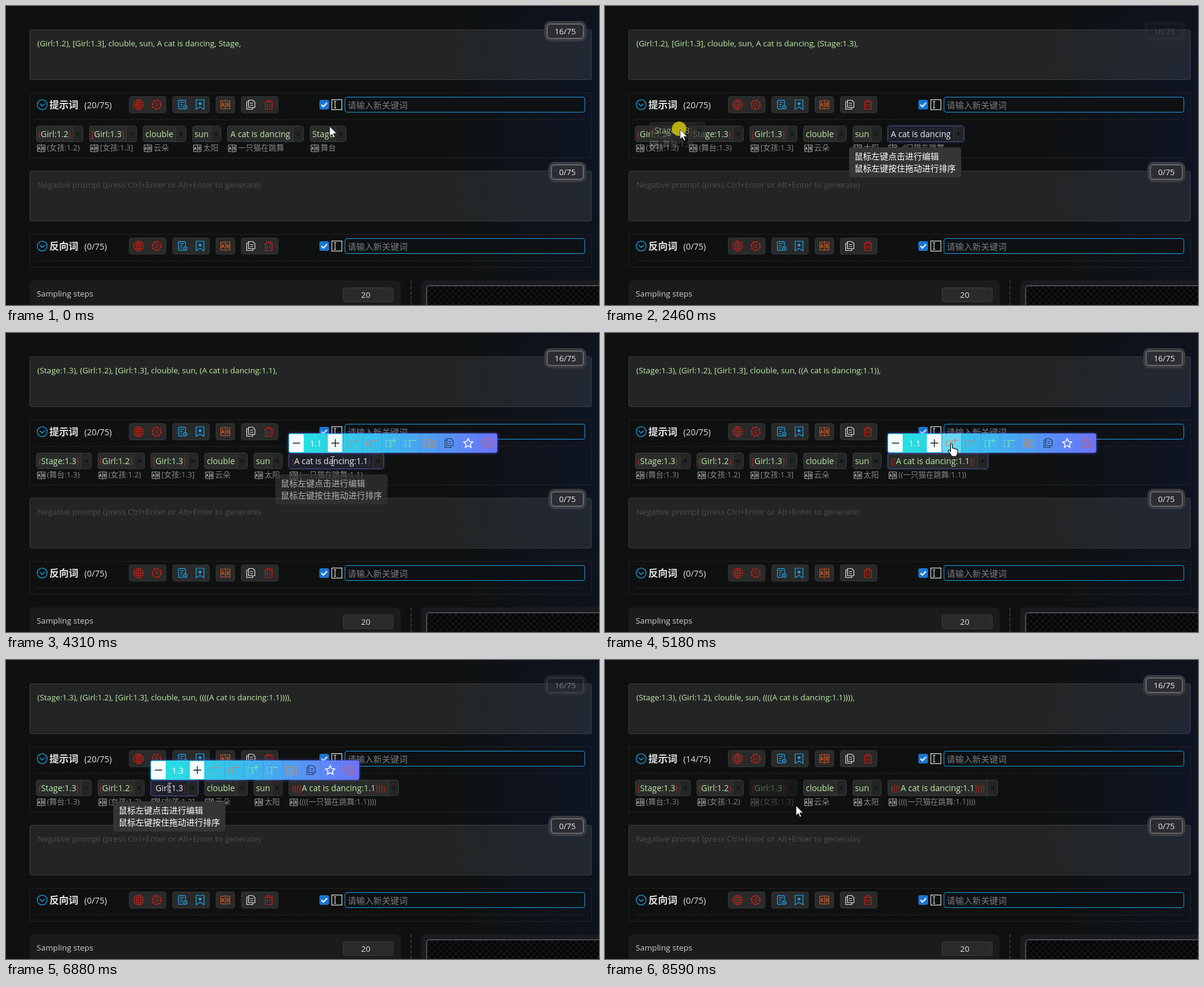
Animation, 984 px wide and 497 px high, one loop 8.89 s. Source, as an HTML page:

```html
<!DOCTYPE html>
<html lang="zh-CN">
<head>
<meta charset="utf-8">
<title>Prompt editor</title>
<style>
html, body { margin: 0; width: 100%; height: 100%; overflow: hidden; background: #0f1110; }
#stage { position: relative; width: 984px; height: 497px; overflow: hidden; cursor: default;
  background: radial-gradient(ellipse 300px 520px at 1020px 190px, #0e1524 0, #0e131e 40%, #0f1110 100%);
  font: 14px/20px "Open Sans", "Noto Sans CJK SC", "Noto Sans CJK", sans-serif; color: #e2e2e2; }
#stage * { box-sizing: border-box; }
#stage div, #stage svg.ico, #stage .abs { position: absolute; white-space: nowrap; }
svg { overflow: visible; fill: none; stroke: currentColor; stroke-width: 1.2; }
.area { left: 39px; width: 933px; height: 84px; border: 1px solid rgba(255,255,255,.1); border-radius: 4px;
  background: rgba(255,255,255,.085); }
.text { left: 52px; font-size: 13.25px; }
.counter { height: 26px; border: 2px solid #65676a; border-radius: 6px; background: #2b2d33;
  box-shadow: 0 0 0 4px #393b3e; font-size: 13.25px; line-height: 22px; text-align: center; color: #eee; }
.section { left: 39px; width: 933px; border: 1px solid #212323; }
.section .rule { left: 10px; top: 43px; width: 911px; border-top: 1px dashed #2c2e2e; }
.title { left: 32px; top: 9px; font-size: 16px; font-weight: 700; color: #e6e6e6; }
.count { left: 90px; top: 10px; }
.group { top: 5px; height: 28px; border: 1px solid #343535; border-radius: 4px; background: #292a2a; }
.check { left: 480px; top: 11px; width: 16px; height: 16px; border-radius: 3px; background: #1a75d2; color: #fff; }
.input { left: 522px; top: 6px; width: 399px; height: 26px; border: 1px solid #1c9be2; border-radius: 4px;
  background: #0e1114; color: #7c7d7e; font-size: 14.2px; line-height: 25px; padding-left: 4px; }
.tag { top: 199px; }
.box { left: 0; top: 0; width: 100%; height: 27px; border: 1px solid #3a3b3b; border-radius: 4px; background: #2a2b2b; }
.label { left: 0; top: 0; right: 16px; height: 25px; line-height: 26px; text-align: center; font-size: 13.8px; color: #bdeca6;
  border-right: 1px solid #3a3b3b; display: flex; justify-content: center; }
.label b { font-weight: 400; color: #b02a1e; }
.close { right: 0; top: 0; width: 16px; height: 25px; line-height: 25px; text-align: center; background: #242525; color: #0a0a0a; }
.active .box { border-color: #474b78; box-shadow: 0 0 3px #3c4186; }
.hover .label { color: #ececec; background: #1e202c; }
.hover .label b { color: #7b2430; }
.tr { left: 18px; top: 26px; font-size: 12.7px; color: #858686; }
.panel { top: 167px; width: 346px; height: 32px; border-radius: 3px; overflow: visible; color: #fff;
  background: linear-gradient(90deg, #22e6df, #3fb5ee 50%, #6c72fb); box-shadow: 0 0 4px #4b5cf0; }
.panel .knob { top: 1px; width: 24px; height: 30px; background: #f4fdfd; color: #222; border-radius: 2px; }
.panel .num { left: 25px; width: 40px; top: 7px; text-align: center; }
.cell { top: 0; width: 32px; height: 32px; border-left: 1px solid rgba(60,90,200,.25); }
.cell.on { background: rgba(255,255,255,.25); }
.tip { padding: 5px 9px; border-radius: 4px; background: #343535; color: #fff; transform: translateX(-50%); }
.tip::before { content: ""; position: absolute; left: 50%; top: -6px; margin-left: -7px;
  border: 7px solid transparent; border-top: 0; border-bottom-color: #343535; }
.dot { width: 24px; height: 24px; border-radius: 50%; background: rgba(214,196,10,.85); }
.steps { left: 39px; top: 456px; width: 616px; height: 60px; border-radius: 8px; background: #1a1b1b; }
.view { left: 689px; top: 456px; width: 320px; height: 60px; border-radius: 8px; background: #191b1f; }
.view div { left: 8px; top: 8px; width: 320px; height: 60px; border: 2px solid #4a4c50; border-radius: 6px;
  background: repeating-conic-gradient(#121212 0 25%, #050505 0 50%) 0 0/10px 10px; }
</style>
</head>
<body>
<svg width="0" height="0" style="position:absolute">
  <symbol id="down" viewBox="0 0 18 18"><circle cx="9" cy="9" r="8.2"/><path d="M4.8 7.3 9 11.3l4.2-4"/></symbol>
  <symbol id="globe" viewBox="0 0 18 18"><g stroke-width="1"><circle cx="9" cy="9" r="8.2"/><ellipse cx="9" cy="9" rx="3.8" ry="8.2"/><path d="M.8 9h16.4M2 5h14M2 13h14M9 1v16"/></g></symbol>
  <symbol id="gear" viewBox="0 0 18 18"><g stroke-width="1"><circle cx="9" cy="9" r="6.6"/><circle cx="9" cy="9" r="7.8" stroke-width="1.5" stroke-dasharray="3.06"/><circle cx="9" cy="9" r="2.6"/></g></symbol>
  <symbol id="doc" viewBox="0 0 18 18"><path d="M10 16.2H3.5q-1.3 0-1.3-1.4V3q0-1.4 1.3-1.4h9q1.3 0 1.3 1.4v6M5 5.2h6M5 8.7h4M5 12.2h3"/><circle cx="13.5" cy="13.2" r="3"/><path d="M13.5 11.8v2.8"/></symbol>
  <symbol id="mark" viewBox="0 0 18 18"><path d="M2.5 1h13v15.7L9 12.9l-6.5 3.8z"/><path fill="currentColor" stroke="none" d="m9 4 1 2.1 2.3.2-1.7 1.6.5 2.3L9 9l-2.1 1.2.5-2.3-1.7-1.6L8 6.1z"/></symbol>
  <symbol id="ab" viewBox="0 0 18 18"><path d="M7.5 2.5h-6v13h6M10.5 2.5h6v13h-6M9 .5v17"/><path d="m3 12 1.8-6 1.8 6M3.6 10.2H6M11.7 6v6h1.6a1.5 1.5 0 0 0 0-3h-1.6 1.4a1.5 1.5 0 0 0 0-3z"/></symbol>
  <symbol id="copy" viewBox="0 0 18 18"><path d="M5.5 13.5V1.5h7l3.5 3.5v8.5zM5.5 4h-3v12.5h10v-3M8 6.5h5M8 10h5"/></symbol>
  <symbol id="trash" viewBox="0 0 18 18"><path d="M1.5 4.5h15M6 4.5V1.8h6v2.7M3.5 4.5v12h11v-12M7 8v5M11 8v5"/></symbol>
  <symbol id="folder" viewBox="0 0 18 18"><path d="M1 2.5h6l1.5 2H17v11.5H1zM5.5 7.5h4v5h-4zM9.5 10h3.5"/></symbol>
  <symbol id="star" viewBox="0 0 18 18"><path stroke-width="1.5" d="m9 1.5 2.3 4.9 5.3.6-3.9 3.7 1 5.3L9 13.4 4.3 16l1-5.3L1.4 7l5.3-.6z"/></symbol>
  <symbol id="ban" viewBox="0 0 18 18"><circle cx="9" cy="9" r="8"/><path d="m3.4 3.4 11.2 11.2"/></symbol>
  <symbol id="caret" viewBox="0 0 18 18"><path d="M.6.6h16.8v16.8H.6zM4 3.5h4M4 14.5h4M6 3.5v11"/></symbol>
  <symbol id="round" viewBox="0 0 18 18"><path d="M2 4Q-1.5 9.5 2 15M6 4q3.5 5.5 0 11"/></symbol>
  <symbol id="square" viewBox="0 0 18 18"><path d="M2.5 4.5H0V15h2.5M5.5 4.5H8V15H5.5"/></symbol>
  <symbol id="plus" viewBox="0 0 18 18"><path d="M10 4.5h8M14 .5v8"/></symbol>
  <symbol id="minus" viewBox="0 0 18 18"><path d="M10 4.5h8"/></symbol>
</svg>
<div id="stage"></div>
<script>
const LOOP = 8890;
const stage = document.getElementById('stage');

const icon = (names, cx, cy, color, size = 18) =>
  `<svg class="ico" width="${size}" height="${size}" style="left:${cx - size / 2}px;top:${cy - size / 2}px;color:${color}">` +
  names.split(' ').map(n => `<use href="#${n}"/>`).join('') + '</svg>';

function add(cls, html = '', style = '', parent = stage) {
  const el = document.createElement('div');
  el.className = cls;
  el.innerHTML = html;
  el.style.cssText = style;
  parent.append(el);
  return el;
}

function section(y, h, title) {
  const red = '#cc2012', blue = '#19a8f2';
  const group = (x, w, icons) => `<div class="group" style="left:${x}px;width:${w}px">` +
    icons.map(([n, cx, c]) => icon(n, cx, 13, c)).join('') + '</div>';
  const el = add('section', icon('down', 20, 19, blue) +
    `<div class="title">${title}</div><div class="count">(0/75)</div>` +
    group(164, 62, [['globe', 15, red], ['gear', 45, red]]) +
    group(236, 62, [['doc', 16, blue], ['mark', 45, blue]]) +
    group(308, 32, [['ab', 15, '#cf5a22']]) +
    group(350, 62, [['copy', 15, '#e0e0e0'], ['trash', 45, red]]) +
    '<div class="check"><svg class="abs" width="16" height="16"><path stroke-width="2" d="m3.5 8 3.2 3.2 6-6.2"/></svg></div>' +
    icon('caret', 509, 19, '#d8d8d8') +
    '<div class="input">请输入新关键词</div><div class="rule"></div>', `top:${y}px;height:${h}px`);
  return el.querySelector('.count');
}

add('area', '', 'top:39px');
const prompt = add('text', '', 'top:52px;color:#bdeca6');
const counter = add('counter', '16/75', 'left:897px;top:29px;width:62px');
const count = section(144, 109, '提示词');
add('area', '', 'top:274px');
add('text', 'Negative prompt (press Ctrl+Enter or Alt+Enter to generate)', 'top:287px;font-size:13.43px;color:#4e5050');
add('counter', '0/75', 'left:904px;top:263px;width:55px');
section(379, 56, '反向词');
add('steps', '<div style="left:12px;top:12px;font-size:13.3px;color:#d0d0d0">Sampling steps</div>' +
  '<div style="left:520px;top:12px;width:84px;height:24px;border:1px solid #3b3c3c;border-radius:4px;background:#292a2a;' +
  'text-align:center;line-height:22px;padding-right:8px;font-size:13.5px">20</div>');
add('', '', 'left:671px;top:456px;height:41px;border-left:2px dashed #303232');
add('view', '<div></div>');

// Tags
const zh = { g1: '女孩', g2: '女孩', cloud: '云朵', sun: '太阳', cat: '一只猫在跳舞', stage: '舞台' };
const others = ['g1', 'g2', 'cloud', 'sun', 'cat'];
function makeTag() {
  const el = add('tag', '<div class="box"><div class="label"></div><div class="close">×</div></div>' +
    icon('ab', 8, 37, '#b4b4b4', 15) + '<div class="tr"></div>');
  return { el, label: el.querySelector('.label'), tr: el.querySelector('.tr') };
}
const tags = {};
for (const id in zh) tags[id] = makeTag();
const ghost = makeTag();

// Weight panel
const panel = add('panel', '<div class="knob" style="left:1px"><svg class="abs" width="24" height="30"><path stroke-width="1.5" d="M6 15h12"/></svg></div>' +
  '<div class="num"></div>' +
  '<div class="knob" style="left:65px"><svg class="abs" width="24" height="30"><path stroke-width="1.5" d="M6 15h13M12.5 8.5v13"/></svg></div>' +
  [['round plus', '#d87a5c'], ['round minus', '#d87a5c'], ['square plus', '#86ecae'], ['square minus', '#86ecae'],
    ['folder', '#dd8a4c'], ['copy', '#27344f'], ['star', '#fff'], ['ban', '#e2614a']]
    .map(([n, c], i) => `<div class="cell" style="left:${90 + 32 * i}px">${icon(n, 15, 16, c)}</div>`).join(''));
const num = panel.querySelector('.num');
const cells = [...panel.querySelectorAll('.cell')];

const tip = add('tip');
const dot = add('dot');
const pointers = {
  arrow: '<path fill="#fff" stroke="#111" stroke-width=".8" d="M0 0v16.5l3.8-3.6 2.6 6 2.4-1-2.6-5.9h5.5z"/>',
  ibeam: '<path stroke="#ddd" stroke-width="1" d="M-3-7.5h2.5l.5.5.5-.5H3M0-7V7M-3 7.5h2.5L0 7l.5.5H3"/>',
  hand: '<path fill="#fff" stroke="#111" d="M-1.5 1.5a1.5 1.5 0 0 1 3 0V7.5q2.3-.7 3 .7 2.2-.5 2.8 1 2.7-.3 2.7 1.8v4c0 2.5-1.5 3.5-1.5 6H0c0-2.5-3.8-5.5-5.3-8.5-.7-1.6 1-2.6 2.2-1.3l1.6 1.8z"/>'
};
const pointer = add('', '<svg class="abs" width="1" height="1"></svg>').firstChild;

// Timeline
const path = [
  [0, 537, 200, 'arrow'], [70, 537, 203, 'ibeam'], [250, 540, 212], [480, 545, 210], [700, 565, 192, 'hand'], [880, 587, 183],
  [1570, 587, 183, 'arrow'], [1720, 640, 392], [1850, 560, 250], [1900, 555, 211], [2000, 520, 212], [2200, 240, 210],
  [2390, 147, 206], [2460, 125, 205], [2560, 92, 207], [2640, 92, 207], [2820, 220, 380], [3000, 330, 465], [3200, 420, 380],
  [3340, 462, 262], [3410, 478, 220, 'ibeam'], [3700, 520, 212], [4000, 542, 213], [4310, 542, 213], [4600, 548, 212],
  [4750, 560, 192, 'hand'], [4950, 575, 184], [5780, 575, 184, 'arrow'], [5930, 430, 264], [6050, 285, 232], [6120, 238, 212],
  [6250, 200, 214, 'ibeam'], [6450, 205, 214], [6600, 258, 214], [6950, 275, 212], [7100, 290, 192, 'hand'], [7350, 430, 184],
  [7500, 530, 178], [7570, 537, 176], [7750, 560, 180], [7850, 570, 183], [8100, 570, 183, 'arrow'], [8250, 548, 270],
  [8350, 480, 287], [8450, 407, 276], [8520, 360, 256], [8590, 317, 242], [LOOP, 317, 242]];
const places = [[0, 5], [1960, 4], [2060, 3], [2150, 2], [2280, 1], [2560, 0]];
const panels = [[110, 1680, 'stage'], [1850, 1960, 'stage'], [3410, 5900, 'cat'], [5980, 6260, 'g2'], [6270, 6540, 'g1'], [6560, 8200, 'g2']];
const hovers = [[80, 600, 'stage'], [1880, 1920, 'stage'], [2000, 2640, 'cat'], [3410, 4680, 'cat'], [6000, 6190, 'g2'], [6200, 6540, 'g1'], [6560, 7060, 'g2']];
const help = '鼠标左键点击进行编辑<br>鼠标左键按住拖动进行排序';
const tips = [[150, 680, 526, 235, help], [1990, 2700, 498, 235, help], [3460, 4500, 524, 235, help], [4310, 4620, 540, 235, help, 80],
  [6670, 7080, 271, 235, help], [7570, 7760, 538, 208, '添加到收藏'], [7780, 8180, 570, 208, '禁用关键词']];
const dips = [[2330, 2700], [3550, 3950], [4780, 5130], [6450, 6950]];

const clamp = v => Math.max(0, Math.min(1, v));
const since = (list, t) => list.filter(s => t >= s).length;
const current = (list, t) => list.filter(e => t >= e[0]).pop();
const fade = (t, s, e, lead = 0) => clamp(Math.min((t - s + lead) / 120, (e - t) / 100));
const put = (el, html) => { if (el.shown !== html) el.innerHTML = el.shown = html; };

function pointerAt(t) {
  const i = path.findLastIndex(k => t >= k[0]);
  const a = path[i], b = path[i + 1] || a;
  const p = b === a ? 0 : (t - a[0]) / (b[0] - a[0]);
  const kind = path.slice(0, i + 1).findLast(k => k[3])[3];
  return { x: a[1] + (b[1] - a[1]) * p, y: a[2] + (b[2] - a[2]) * p, kind };
}

function orderAt(place) {
  const list = others.slice();
  list.splice(place, 0, 'stage');
  return list;
}

function layout(order, width) {
  let x = 50;
  const pos = {};
  for (const id of order) { pos[id] = x; x += width[id] + 10; }
  return pos;
}

function fill(tag, text, id) {
  const [, open, body, close] = text.match(/^([(\[]*)(.*?)([)\]]*)$/);
  put(tag.label, `<b>${open}</b><span style="white-space:pre">${body}</span><b>${close}</b>`);
  put(tag.tr, open + body.replace(/^[^:]+/, zh[id]) + close);
}

function render(t) {
  const weight = since([1000, 1150, 1300], t);
  const nest = since([4310, 5110, 5260, 5460], t);
  const off = t >= 8060;
  const text = {
    g1: '(Girl:1.2)', g2: '[Girl:1.3]', cloud: 'clouble', sun: 'sun',
    cat: nest ? '('.repeat(nest) + 'A cat is dancing:1.1' + ')'.repeat(nest) : 'A cat is dancing',
    stage: weight ? `(Stage:1.${weight})` : 'Stage'
  };
  const width = { g1: 78, g2: 79, cloud: 72, sun: 48, cat: nest ? Math.round(150 + 8.3 * nest) : 127, stage: weight ? 92 : 61 };

  const i = places.findLastIndex(p => t >= p[0]);
  const to = layout(orderAt(places[i][1]), width);
  const from = layout(orderAt(places[Math.max(0, i - 1)][1]), width);
  const slide = clamp((t - places[i][0]) / 150);
  const hover = hovers.find(h => t >= h[0] && t < h[1]);
  const pan = current(panels, t);
  const panOn = pan && t < pan[1];

  for (const id in tags) {
    const { el } = tags[id];
    fill(tags[id], text[id], id);
    const over = hover && hover[2] === id;
    el.className = 'tag' + (over ? ' hover' : '') + (over || panOn && pan[2] === id ? ' active' : '');
    el.style.left = from[id] + (to[id] - from[id]) * slide + 'px';
    el.style.width = width[id] + 'px';
    el.style.opacity = id === 'g2' && off ? .45 : 1;
  }

  put(prompt, orderAt(t < 2740 ? 5 : 0).filter(id => !(off && id === 'g2')).map(id => text[id]).join(', ') + ',');
  put(count, off ? '(14/75)' : '(20/75)');
  counter.style.opacity = 1 - .85 * Math.max(...dips.map(([s, e]) => fade(t, s, e)));

  const c = pointerAt(t);
  put(pointer, pointers[c.kind]);
  pointer.parentNode.style.transform = `translate(${c.x}px,${c.y}px)`;

  const drag = t >= 1920 && t < 2640;
  ghost.el.style.display = dot.style.display = drag ? '' : 'none';
  if (drag) {
    fill(ghost, text.stage, 'stage');
    ghost.el.style.cssText = `opacity:.65;left:${c.x - 51}px;top:${c.y - 12}px;width:92px`;
    dot.style.left = c.x - 14 + 'px';
    dot.style.top = c.y - 13 + 'px';
  }

  panel.style.opacity = pan ? fade(t, pan[0], pan[1]) : 0;
  if (pan) {
    const left = to[pan[2]];
    panel.style.left = left + 'px';
    put(num, (text[pan[2]].match(/1\.\d/) || ['1'])[0]);
    const at = c.kind === 'hand' ? Math.floor((c.x - left - 90) / 32) : -1;
    cells.forEach((el, n) => el.classList.toggle('on', n === at));
  }

  const tp = current(tips, t);
  const shown = tp ? fade(t, tp[0], tp[1], tp[5] || 40) : 0;
  tip.style.opacity = shown;
  if (tp) {
    put(tip, tp[4]);
    tip.style.left = tp[2] + 'px';
    tip.style.top = tp[3] + (tp[3] === 208 ? 4 * (1 - shown) : 0) + 'px';
  }
}

const begin = performance.now();
function tick() {
  render((performance.now() - begin) % LOOP);
  requestAnimationFrame(tick);
}
tick();
</script>
</body>
</html>
```
